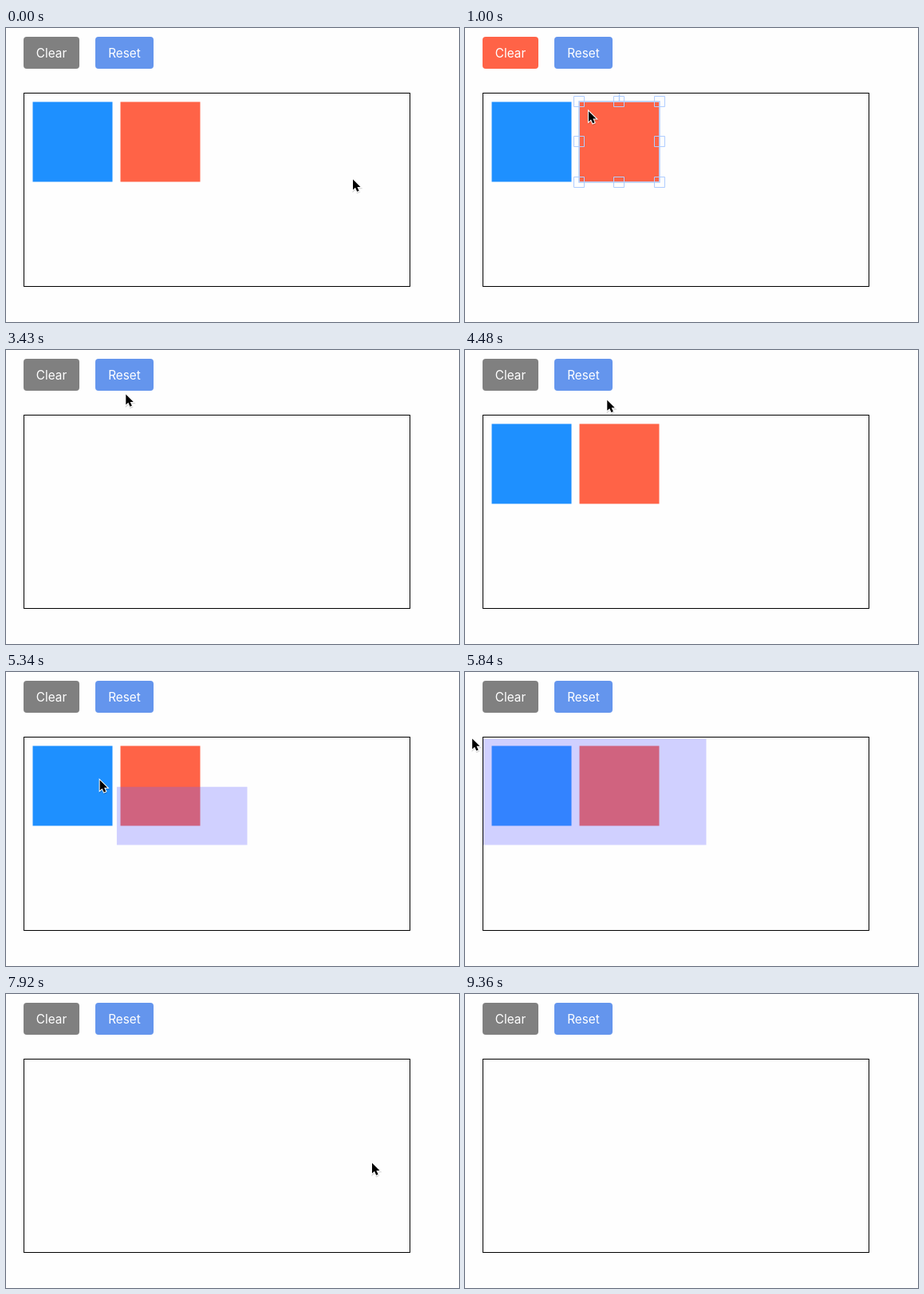
These frames come from a looping animation (568x368 px, 9630 ms). An HTML page:

```html
<!DOCTYPE html>
<html lang="en">
<head>
<meta charset="utf-8">
<title>Select and clear</title>
<style>
  html, body { margin: 0; width: 100%; height: 100%; overflow: hidden; background: #fefefe; }
  svg { display: block; }
  text { font: 15.3px Inter, Roboto, sans-serif; fill: #fff; text-anchor: middle; }
</style>
</head>
<body>
<svg width="568" height="368" viewBox="0 0 568 368">
  <clipPath id="inside"><rect x="23" y="82" width="483" height="241"/></clipPath>
  <rect id="clear" x="22" y="11" width="70" height="40" rx="4"/>
  <text x="57" y="37">Clear</text>
  <rect x="112" y="11" width="73" height="40" rx="4" fill="#6495ed"/>
  <text x="148.5" y="37">Reset</text>
  <rect x="22.5" y="81.5" width="484" height="242" fill="none" stroke="#000"/>
  <g clip-path="url(#inside)">
    <rect id="blue" x="33.5" y="92.5" width="100" height="100" fill="#1e90ff"/>
    <rect id="red" x="143.5" y="92.5" width="100" height="100" fill="#ff6347"/>
    <g fill="none" stroke="#afcdff">
      <path id="frame" stroke-width="1.5"/>
      <path id="handles"/>
    </g>
    <rect id="marquee" fill="#6464ff" fill-opacity=".3"/>
  </g>
  <g id="cursor">
    <g id="arrow">
      <path d="M1 2V15L4 12.3 6.2 17.2 8.6 16.2 6.4 11.4H10.5Z" transform="translate(.4 .9)"
            fill="none" stroke="#000" stroke-width="2" opacity=".15"/>
      <path d="M1 1.5V14.5L4 11.8 6.2 16.7 8.6 15.7 6.4 10.9H10.5Z"
            stroke="#fff" stroke-width="2" paint-order="stroke"/>
    </g>
    <g id="denied" fill="none" transform="translate(10 23)">
      <circle r="7.5" fill="#fff" fill-opacity=".8" stroke="#fff" stroke-width="4"/>
      <path d="M-5-5 5 5" stroke="#858585" stroke-width="2.5"/>
      <circle r="7.3" stroke="#858585" stroke-width="2.3"/>
    </g>
    <g id="hand" transform="translate(-3 2)" stroke="#000" stroke-linejoin="round">
      <path fill="#fff" stroke-width="1.2" d="M5 9.6 3.2 3.4Q3 1 4.6 1T6.3 2.7L7.3 6Q8.2 5 9.3 6.1 10.4 5.2 11.4 6.7 13 6 13.7 8L14.5 11Q14.8 13 13.8 16.5H7.5Q6 14.5 4.6 13.3L1.5 10.5Q.6 9 2.2 8.6 3.6 8.6 5 9.6Z"/>
      <path fill="none" stroke-width=".9" d="M8 10.5 8.7 14M10 10.2 10.7 14M12 10 12.5 13.5"/>
    </g>
  </g>
</svg>
<script>
const DURATION = 9630;
const el = id => document.getElementById(id);
const show = (id, on) => el(id).setAttribute('visibility', on ? 'inherit' : 'hidden');
const set = (id, attrs) => {
  for (const name in attrs) el(id).setAttribute(name, attrs[name]);
};

const smooth = u => u * u * (3 - 2 * u);
const linear = u => u;
const easeOut = u => 1 - (1 - u) ** 2;

// Cursor stops: time, x, y, easing of the way to that stop
const stops = [
  [0, 434, 188], [50, 434, 188], [390, 193, 139],
  [720, 193, 139], [1450, 75, 29],
  [1950, 75, 29], [2210, 95, 117],
  [2440, 95, 117], [3070, 69, 31],
  [3210, 69, 31], [3430, 149, 54, linear], [3620, 179, 57, easeOut],
  [3730, 179, 57], [3930, 145, 21],
  [4320, 145, 21], [4870, 301, 216],
  [5080, 301, 216], [5340, 117, 134, linear], [6020, 0, 78, easeOut],
  [6430, -2, 77], [6720, 62, 26],
  [7400, 62, 26], [7780, 458, 210],
  [8360, 458, 210], [8820, 224, 93], [9360, 520, 368],
  [DURATION, 520, 368]
];

function cursorAt(t) {
  const i = stops.findIndex(stop => stop[0] > t);
  const [t0, x0, y0] = stops[i - 1];
  const [t1, x1, y1, ease = smooth] = stops[i];
  const u = ease((t - t0) / (t1 - t0));
  return [x0 + (x1 - x0) * u, y0 + (y1 - y0) * u];
}

const box = (x, y, w, h) => `M${x} ${y}h${w}v${h}h${-w}z`;

function drawSelection(left, width, isGroup) {
  const top = 92, size = 101, middle = left + width / 2;
  let frame = box(left, top, width, size) + `M${middle} ${top}V70`;
  if (isGroup) frame += box(33, top, size, size) + box(143, top, size, size);
  let handles = '';
  for (const x of [left, middle, left + width])
    for (const y of [top, top + size / 2, top + size])
      if (x !== middle || y !== top + size / 2)
        handles += box(Math.floor(x) - 6.5, Math.floor(y) - 6.5, 13, 13);
  set('frame', { d: frame });
  set('handles', { d: handles });
}

function render(t) {
  const during = (from, to) => t >= from && t < to;
  const redPicked = during(720, 1810);
  const bluePicked = during(2440, 3110);
  const bothPicked = during(6260, 7920);
  const enabled = redPicked || bluePicked || during(6260, 7140);

  set('clear', { fill: enabled ? '#ff6347' : '#808080' });
  show('blue', t < 3110 || during(4320, 7140));
  show('red', t < 1810 || during(4320, 7140));

  const picked = redPicked || bluePicked || bothPicked;
  show('frame', picked);
  show('handles', picked);
  if (picked) drawSelection(redPicked ? 143 : 33, bothPicked ? 211 : 101, bothPicked);

  // The marquee trails the pointer slightly
  const dragging = during(5112, 6260);
  show('marquee', dragging);
  if (dragging) {
    const [x, y] = cursorAt(Math.min(t - 32, 6019));
    set('marquee', { x, y, width: Math.max(0, 302.5 - x), height: Math.max(0, 216.5 - y) });
  }

  const [x, y] = cursorAt(t);
  const over = (left, right) => x + 1 >= left && x + 1 < right && y + 1 >= 11 && y + 1 < 51;
  const onClear = over(22, 92);
  const hand = over(112, 185) || onClear && enabled;
  show('cursor', !during(6050, 6470) && t < 9360);
  show('arrow', !hand);
  show('hand', hand);
  show('denied', onClear && !enabled);
  set('cursor', { transform: `translate(${x} ${y})` });
}

const start = performance.now();
function tick() {
  render((performance.now() - start) % DURATION);
  requestAnimationFrame(tick);
}
tick();
</script>
</body>
</html>
```
